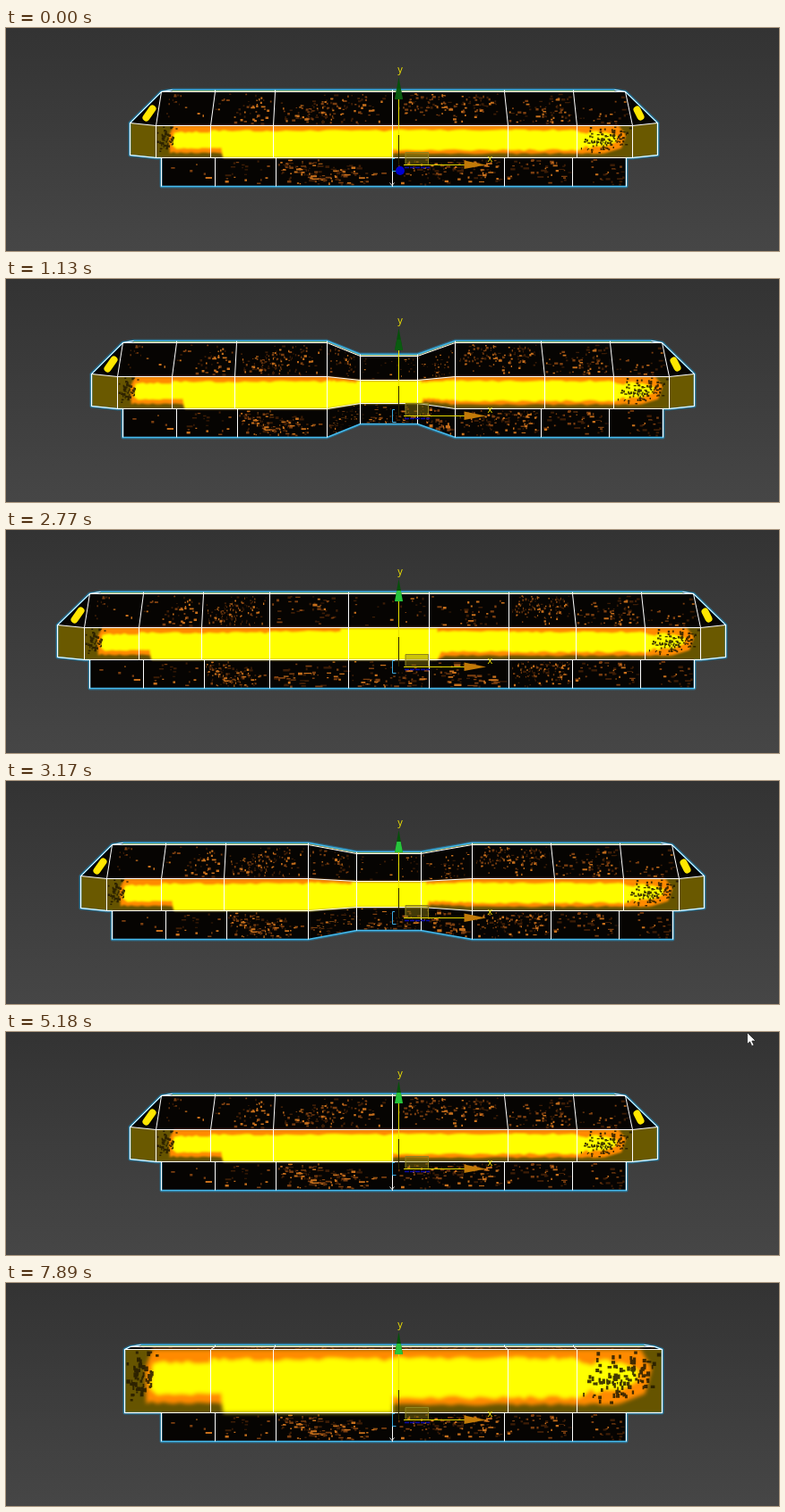
An HTML page for the animation above (8000 ms loop, 863x250 px).

```html
<!DOCTYPE html>
<html lang="en">
<head>
<meta charset="utf-8">
<title>Bridge mesh</title>
<style>
html, body { margin: 0; width: 100%; height: 100%; overflow: hidden; background: #3d3d3d; }
svg { display: block; width: 863px; height: 250px; }
text { font: 11px "Open Sans", "DejaVu Sans", sans-serif; fill: #f2e400; text-anchor: middle; }
path { fill: none; }
</style>
</head>
<body>
<svg viewBox="0 0 863 250">
  <defs>
    <linearGradient id="bg" x2="0" y2="1">
      <stop stop-color="#333"/><stop offset="1" stop-color="#464646"/>
    </linearGradient>
    <filter id="soft" x="-5%" y="-20%" width="110%" height="140%"><feGaussianBlur id="blur" stdDeviation="1"/></filter>
    <filter id="fuzz" x="-5%" y="-20%" width="110%" height="140%"><feGaussianBlur stdDeviation=".65"/></filter>
    <clipPath id="hull"><path id="hullPath"/></clipPath>
  </defs>
  <rect width="863" height="250" fill="url(#bg)"/>
  <g transform="translate(-.5 -.5)">
    <path id="glow" stroke="#1d8fc4" stroke-width="4" stroke-linejoin="round" opacity=".5"/>
    <path id="body" style="fill:#060402"/>
    <g clip-path="url(#hull)">
      <path id="sides" style="fill:#6a5900"/>
      <g filter="url(#fuzz)">
        <path id="spots" stroke="#ffe600" stroke-width="8" stroke-linecap="round"/>
        <path id="speck0" style="fill:#3d1d06"/>
        <path id="speck1" style="fill:#7c3f10"/>
        <path id="speck2" style="fill:#c8701c"/>
      </g>
      <path id="band" style="fill:#665400"/>
      <g filter="url(#soft)">
        <path id="orange" style="fill:#ff8a00"/>
        <path id="yellow" style="fill:#ff0"/>
      </g>
      <path id="grime" style="fill:#241b00" opacity=".85" filter="url(#fuzz)"/>
    </g>
    <path id="rim" stroke="#a89a1c"/>
    <path id="outline" stroke="#45b9ec" stroke-width="1.700" stroke-linejoin="round"/>
    <path id="wire" stroke="#fff"/>
    <path d="M429 174l2.500 3 2.500-3" stroke="#ddd" id="tick"/>
  </g>
  <g id="gizmo">
    <path d="M446 139h26v14h-26z" style="fill:#8f7d10;fill-opacity:.45"/>
    <path d="M446 152.500v-13h25.500v13" stroke="#8f8420"/>
    <path d="M434 146.500h-2.500v14h4" stroke="#3aa9e0"/>
    <path d="M438.500 80v42" stroke="#e8e000"/>
    <path d="M438.500 120v33" stroke="#2a2600"/>
    <path d="M445 156.500h28" stroke="#0808a8" stroke-width="1.500" stroke-dasharray="5 1"/>
    <path d="M444 153.500h68" stroke="#e6d800"/>
    <path d="M511.500 148.500L536 153.500 511.500 158z" style="fill:#c27a08"/>
    <circle id="dot" cx="440" cy="160" r="5"/>
    <path d="M438.500 55L443 80h-9z" style="fill:#06500a"/>
    <path id="cone" d="M436.300 68h4.400l2.300 12h-9z"/>
    <text x="440" y="50">y</text>
    <text x="540.500" y="150">x</text>
  </g>
  <path id="cursor" d="M827.500 .5v13l3-2.600 2.200 4.800 2.300-1-2.200-4.700h4.200z" style="fill:#fff" stroke="#222" stroke-width=".8"/>
</svg>
<script>
const $ = id => document.getElementById(id);
const LOOP = 8000;

// Seeded random numbers
let seed = 11;
function rnd() {
  seed = (seed * 1664525 + 1013904223) % 4294967296;
  return seed / 4294967296;
}
const spread = () => rnd() + rnd() + rnd() - 1.5;
const mix = (a, b, f) => a + (b - a) * f;

// The viewport refreshes only at these times
const ticks = [0, 500, 670, 745, 820, 970, 1050, 1130, 1240, 1310, 1390, 1470, 1530, 1600, 1750, 1920,
  2770, 2840, 2920, 3000, 3080, 3160, 3240, 3320, 3400, 3480, 3710, 4030, 4190,
  6190, 6340, 6500, 6730, 6800, 6880, 6990, 7050, 7200, 7270, 7890];
const pullKeys = [[499, 0], [500, .5], [670, 11], [1130, 42], [1600, 74], [1750, 78], [1920, 79],
  [2770, 78.5], [3480, 33], [3710, 18], [4030, 4], [4190, 0]];
const riseKeys = [[6180, 0], [6190, 2], [6340, 5], [6500, 9], [6880, 19.5], [7050, 26], [7200, 32], [7270, 35], [7890, 35.5]];

function track(keys, t) {
  if (t <= keys[0][0]) return keys[0][1];
  for (let i = 1; i < keys.length; i++) {
    const [t0, a] = keys[i - 1], [t1, b] = keys[i];
    if (t <= t1) return mix(a, b, (t - t0) / (t1 - t0));
  }
  return keys[keys.length - 1][1];
}

// Column positions of the mesh at rest
const TOP = [174, 234, 301, 432, 557, 634, 692];
const MID = [168, 229, 299, 432, 561, 638, 700];
const LOW = [174, 234, 302, 432, 557, 633, 693];

// Mesh rows; columns 4 and 5 are the neck of the bridge
function build(pull, rise) {
  const left = pull * 1.02, right = pull * .965, half = 18 + .345 * pull;
  const pinch = pull ? .4 + .6 * pull / 79 : 1;
  const row = (k, y, r = 0) => {
    const l = k[3] - 1.75 * pull, e = k[3] + 1.66 * pull;
    return [k[0] - left - r, k[1] - left, k[2] - left, l, Math.max(l, 428 - half), Math.min(e, 428 + half), e,
      k[4] + right, k[5] + right, k[6] + right + .92 * r]
      .map((x, i) => [Math.round(x), Math.round(i === 4 || i === 5 ? 124 + (y - 124) * pinch : y)]);
  };
  const inset = r => r.map(([x, y], i) => [x + (i === 0 ? 12 : i === 9 ? -12 : 0), y]);
  return {
    rim: inset(row(TOP, 70, rise)), gold: inset(row(TOP, 71, rise)),
    top: row(TOP, 72, rise), up: row(MID, 110 - rise, rise),
    mid: row(MID, 146, rise), low: row(LOW, 146), foot: row(LOW, 178),
    outL: Math.min(Math.round(138.5 - left), Math.round(168 - left - rise)),
    outR: Math.max(Math.round(728 + right), Math.round(700 + right + .92 * rise))
  };
}

// Point at column s and depth v between rows a and b
function at(a, b, s, v) {
  const i = Math.min(8, Math.floor(s)), f = s - i;
  const on = (r, n) => mix(r[i][n], r[i + 1][n], f);
  return [mix(on(a, 0), on(b, 0), v), mix(on(a, 1), on(b, 1), v)];
}

const line = pts => 'M' + pts.map(p => p[0].toFixed(1) + ' ' + p[1].toFixed(1)).join('L');
const shape = pts => line(pts) + 'Z';

const WIDTHS = [60, 68, 131, 70, 90, 70, 126, 77, 60];
function scatter(counts, tall, length) {
  const list = [];
  counts.forEach((n, i) => {
    const hubs = Array.from({ length: 7 }, () => [rnd(), rnd()]);
    for (let k = 0; k < n; k++) {
      const hub = hubs[k % 7];
      const u = hub[0] + spread() * .28, v = hub[1] + spread() * .4;
      if (u < .02 || u > .94 || v < .04 || v > .92) continue;
      const q = rnd();
      list.push({ s: i + u, v, w: (1.4 + length * rnd() * rnd()) / WIDTHS[i], h: (1 + 1.6 * rnd()) / tall,
        c: q < .45 ? 0 : q < .78 ? 1 : 2 });
    }
  });
  return list;
}
const upper = scatter([22, 70, 190, 70, 40, 70, 160, 120, 50], 37, 4);
const lower = scatter([10, 30, 210, 80, 110, 80, 190, 90, 45], 32, 7);

const grime = [];
function soil(n, s, ds, v, dv) {
  while (n--) {
    grime.push({ s: Math.min(8.94, Math.max(.02, s + ds * spread())), v: Math.min(.95, Math.max(.03, v + dv * spread())),
      w: .015 + .035 * rnd(), h: .03 + .05 * rnd() });
  }
}
soil(60, .16, .16, .4, .45);
soil(75, 8.45, .32, .45, .32);
soil(30, 8.75, .2, .25, .3);

const dab = (a, b, o) => {
  const p = at(a, b, o.s, o.v), q = at(a, b, Math.min(9, o.s + o.w), Math.min(1, o.v + o.h));
  return `M${p.map(n => n.toFixed(1)).join(' ')}H${q[0].toFixed(1)}V${q[1].toFixed(1)}H${p[0].toFixed(1)}Z`;
};

// Ragged edge along the band
function edge(s0, s1, v, amp = 0) {
  const n = Math.ceil(Math.abs(s1 - s0) / .07);
  return Array.from({ length: n + 1 }, (_, i) => [mix(s0, s1, i / n), Math.max(0, v + amp * (rnd() * 2 - 1))]);
}
const orange = [...edge(.32, 8.75, 0), [8.88, .3], [8.8, .7], ...edge(8.5, 5.2, .87, .02), ...edge(5.1, 1.2, 1),
  ...edge(1.17, .25, .84, .02), [.24, .3]];
const yellow = [...edge(.33, 1, .2, .03), ...edge(1, 3, .16, .03), ...edge(3, 3.9, .12, .02), ...edge(3.9, 5.1, .03),
  ...edge(5.1, 6, .12, .02), ...edge(6, 8, .14, .03), ...edge(8.05, 8.5, .21, .05), [8.72, .32], [8.7, .5],
  ...edge(8.5, 8.1, .68, .06), ...edge(8, 5.15, .75, .03), ...edge(5.1, 1.2, 1), ...edge(1.17, .38, .7, .02), [.3, .62]];

function draw(tick) {
  const pull = track(pullKeys, tick), rise = track(riseKeys, tick);
  const g = build(pull, rise);
  const set = (id, d) => $(id).setAttribute('d', d);
  const back = r => r.slice().reverse();
  const corner = rise > 22;
  const drop = 143 + Math.min(3, rise / 12);

  const hull = shape([
    [g.outL, drop], [g.outL, corner ? g.up[0][1] : 107], ...(corner ? [g.up[0]] : []), g.top[0],
    ...g.rim,
    g.top[9], ...(corner ? [g.up[9]] : []), [g.outR, corner ? g.up[9][1] : 107], [g.outR, drop],
    g.mid[9], g.low[9], ...back(g.foot), g.low[0], g.mid[0]]);
  ['glow', 'body', 'hullPath', 'outline'].forEach(id => set(id, hull));

  const sideL = [g.up[0], [g.outL, 107], [g.outL, drop], g.mid[0]];
  const sideR = [g.up[9], [g.outR, 107], [g.outR, drop], g.mid[9]];
  set('sides', shape(sideL) + shape(sideR));

  const left = g.top[0][0], end = g.top[9][0], shown = rise < 14;
  set('spots', shown ? `M${left - 17} ${101 - rise}l7 -10M${end + 13} ${92 - rise * .7}l4 8` : '');
  $('spots').setAttribute('stroke-width', Math.max(0, 8 - rise * .55));
  $('blur').setAttribute('stdDeviation', 1 + rise * .025);

  for (let c = 0; c < 3; c++) {
    const pick = (list, a, b) => list.filter(o => o.c === c).map(o => dab(a, b, o)).join('');
    set('speck' + c, pick(upper, g.top, g.up) + pick(lower, g.low, g.foot));
  }
  const onBand = pts => shape(pts.map(([s, v]) => at(g.up, g.mid, s, v)));
  set('band', shape([...g.up, ...back(g.mid)]));
  set('orange', onBand(orange));
  set('yellow', onBand(yellow));
  set('grime', grime.map(o => dab(g.up, g.mid, o)).join(''));

  set('rim', line(g.gold));
  let wire = line(g.top) + line(g.up) + line(g.mid);
  for (let i = 0; i < 10; i++) {
    wire += line([g.rim[i], g.top[i], g.up[i], g.mid[i]]) + line([g.low[i], g.foot[i]]);
  }
  wire += line(sideL) + line(sideR);
  if (!corner) wire += line([g.top[0], [g.outL, 107]]) + line([g.top[9], [g.outR, 107]]);
  set('wire', wire);

  $('tick').style.display = pull ? 'none' : '';
  $('cone').style.fill = tick < 1920 ? '#0a5c10' : '#27c43c';
  const still = tick < 500, navy = tick === 3710;
  $('dot').style.display = still || navy ? '' : 'none';
  $('dot').style.fill = still ? '#0000d0' : '#00004e';
}

let last = -1;
function frame() {
  const t = performance.now() % LOOP;
  let tick = 0;
  for (const k of ticks) if (k <= t) tick = k;
  if (tick !== last) draw(last = tick);
  $('cursor').style.display = t >= 5180 && t < 5260 ? '' : 'none';
  requestAnimationFrame(frame);
}
frame();
</script>
</body>
</html>
```
